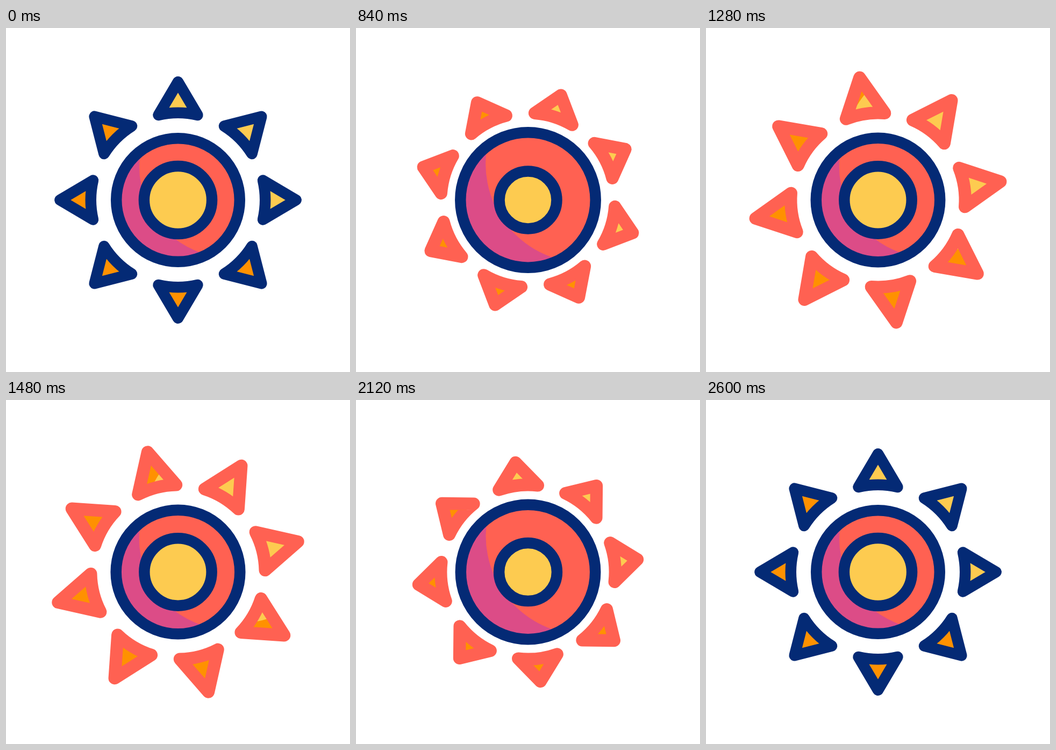
An HTML page with a canvas for the animation above (3000 ms loop, 640 by 640 pixels).

```html
<!DOCTYPE html>
<html lang="en">
<head>
<meta charset="utf-8">
<title>Turning sun</title>
<style>
  html, body { margin: 0; width: 100%; height: 100%; overflow: hidden; background: #fff; }
  canvas { display: block; }
</style>
</head>
<body>
<canvas id="stage" width="640" height="640"></canvas>
<script>
const ctx = document.getElementById('stage').getContext('2d');
const NAVY = '#042a75', RED = '#ff6152', PINK = '#dc4c87', YELLOW = '#fdcb50', ORANGE = '#ff9100';
const LOOP = 3000, STEP = 40, START = 240, END = 2600;
const TAU = Math.PI * 2;

// Cubic Bezier easing with control points (x1, 0) and (x2, 1).
function ease(x, x1, x2) {
  if (x <= 0) return 0;
  if (x >= 1) return 1;
  let lo = 0, hi = 1;
  for (let i = 0; i < 24; i++) {
    const s = (lo + hi) / 2, r = 1 - s;
    if (3 * x1 * s * r * r + 3 * x2 * s * s * r + s ** 3 < x) lo = s; else hi = s;
  }
  return lo * lo * (3 - 2 * lo);
}

// Eased value through [time, value] keys.
function track(t, keys) {
  if (t <= keys[0][0]) return keys[0][1];
  for (let i = 1; i < keys.length; i++) {
    const [t0, v0] = keys[i - 1], [t1, v1] = keys[i];
    if (t < t1) return v0 + (v1 - v0) * ease((t - t0) / (t1 - t0), 0.5, 0.5);
  }
  return keys[keys.length - 1][1];
}

function circle(x, y, r) {
  const path = new Path2D();
  path.arc(x, y, r, 0, TAU);
  return path;
}

// Fills a shape, shading the part that lies outside the light circle.
function fillShaded(shape, light, color, shade) {
  ctx.fillStyle = color;
  ctx.fill(shape);
  const outside = new Path2D();
  outside.rect(-320, -320, 640, 640);
  outside.addPath(light);
  ctx.save();
  ctx.clip(shape);
  ctx.fillStyle = shade;
  ctx.fill(outside, 'evenodd');
  ctx.restore();
}

function outline(shape, color, width) {
  ctx.strokeStyle = color;
  ctx.lineWidth = width;
  ctx.stroke(shape);
}

function drawRays(turn, tip, hot) {
  const rays = new Path2D();
  for (let i = 0; i < 8; i++) {
    const a = turn + (i / 8 - 0.25) * TAU;
    rays.moveTo(tip * Math.cos(a), tip * Math.sin(a));
    rays.arc(0, 0, 162.2, a - 0.227, a + 0.227);
    rays.closePath();
  }
  fillShaded(rays, circle(114.5, -84, 179), YELLOW, ORANGE);
  outline(rays, hot ? RED : NAVY, hot ? 23.3 : 20.5);
}

function drawDisc(swell) {
  const r = 114.8 + 11 * swell, k = r / 114.8;
  const disc = circle(0, 0, r), core = circle(0, 0, 63.1 - 9.7 * swell);
  fillShaded(disc, circle(97 * k, -62 * k, 169 * k), RED, PINK);
  outline(disc, NAVY, 20.5);
  ctx.fillStyle = YELLOW;
  ctx.fill(core);
  outline(core, NAVY, 20.5);
}

function draw(t) {
  const swell = track(t, [[START, 0], [800, 1], [1370, 0], [2010, 1], [END, 0]]);
  const tip = track(t, [[START, 219.7], [800, 204], [1370, 231.4], [2010, 204], [END, 219.7]]);
  const turn = Math.PI * ease((t - START) / (END - START), 0.584, 0.303);
  ctx.setTransform(1, 0, 0, 1, 320, 320);
  ctx.clearRect(-320, -320, 640, 640);
  ctx.lineJoin = 'round';
  drawRays(turn, tip, t >= 800 && t < END);
  drawDisc(swell);
}

function tick() {
  draw(Math.floor(performance.now() % LOOP / STEP) * STEP);
  requestAnimationFrame(tick);
}
tick();
</script>
</body>
</html>
```
